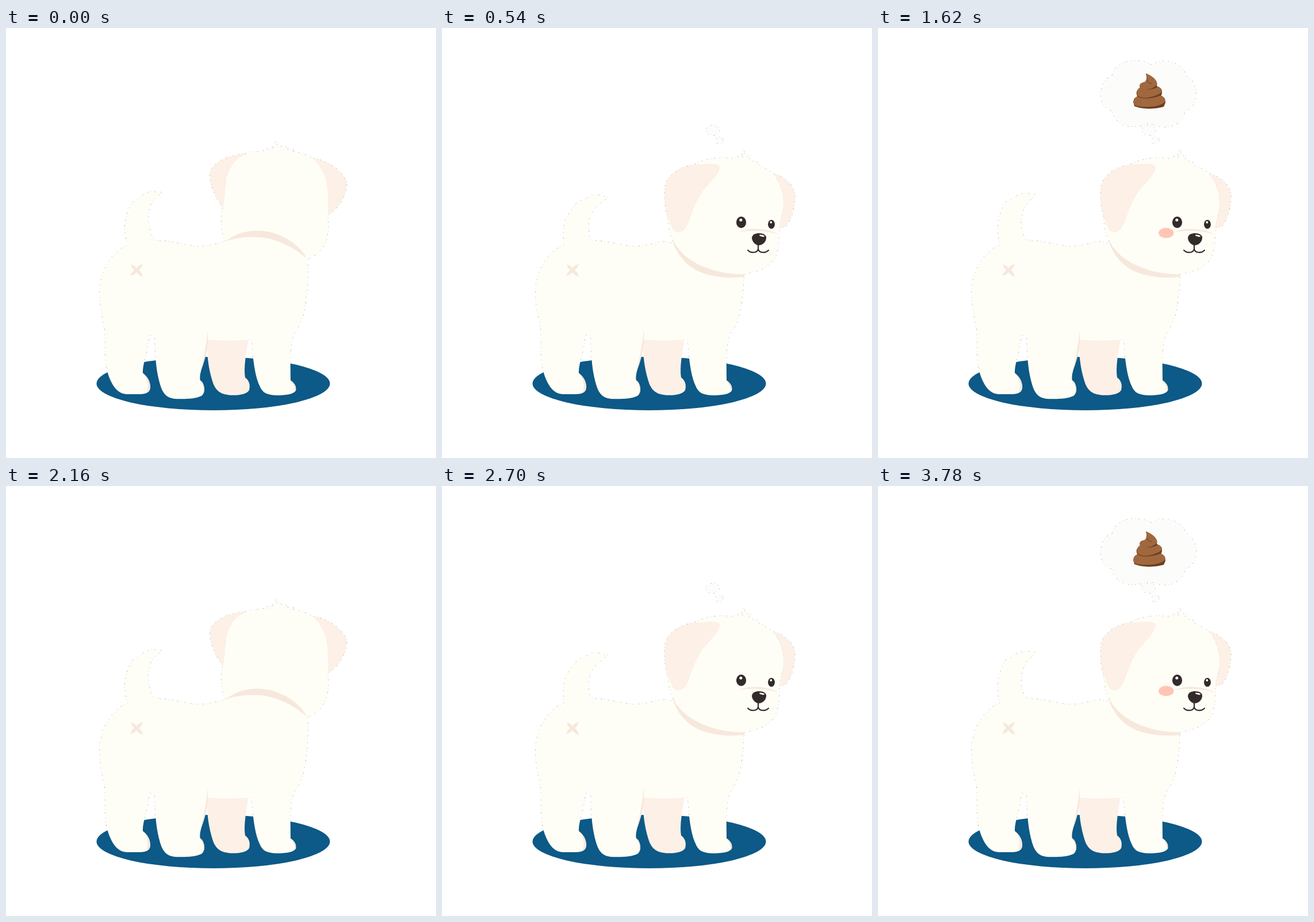
Animation of 748 by 748 pixels, one loop 4320 ms. Source, as an HTML page without scripts:

```html
<!DOCTYPE html>
<html lang="en">
<head>
<meta charset="utf-8">
<title>Puppy with a thought</title>
<style>
  html, body { margin: 0; width: 100%; height: 100%; overflow: hidden; background: #fff; }
  svg { display: block; width: 100%; height: 100%; }
  .fur { fill: #fffef6; }
  .ear { fill: #fdf0e6; }
  .shade { fill: #f7e8dd; }
  .ink { fill: #332b2a; }
  .cloud { fill: #fcfcfa; }
  .edge { stroke: #9a9a94; stroke-width: 1; stroke-dasharray: 2 5 1 4 3 7; }

  /* one cycle is eight beats of 270 ms */
  .back, .dot, .front, .thought, .left, .right, .blush { animation: 2160ms step-end infinite; }
  .back { animation-name: back; }
  .dot { animation-name: dot; }
  .front { animation-name: front; }
  .thought { animation-name: thought; }
  .left { animation-name: left; }
  .right { animation-name: right; }
  .blush { animation-name: blush; }
  @keyframes back { 0% { visibility: visible } 25%, 100% { visibility: hidden } }
  @keyframes dot { 0% { visibility: hidden } 12.5%, 100% { visibility: visible } }
  @keyframes front { 0% { visibility: hidden } 25%, 100% { visibility: visible } }
  @keyframes thought { 0% { visibility: hidden } 37.5%, 100% { visibility: visible } }
  @keyframes left { 0%, 62.5% { visibility: hidden } 37.5%, 75%, 100% { visibility: visible } }
  @keyframes right { 0%, 37.5%, 75%, 100% { visibility: hidden } 25%, 62.5% { visibility: visible } }
  @keyframes blush { 0% { opacity: 0 } 50% { opacity: .45 } 62.5%, 100% { opacity: 1 } }
</style>
</head>
<body>
<svg viewBox="0 0 748 748">
  <defs>
    <path id="body" class="fur" d="M213 377C185 388 165 420 163 455C162 480 168 505 172 525C173 550 171 575 176 597C181 614 190 636 210 637H232C245 637 251 633 251 625C251 614 246 607 238 600C237 585 248 560 249 537Q249 534 252 534H257Q259 535 259 540C259 575 262 600 268 620C273 637 280 643 293 645C310 646 330 645 340 640C348 634 346 621 338 613C336 607 339 597 341 590C345 575 350 560 351 542Q386 545 421 542Q427 540 428 545C429 575 433 605 441 622C446 634 452 638 470 639C488 639 500 637 504 631C506 624 502 618 495 613C495 590 494 570 496 552C498 535 504 528 509 519C520 500 526 465 525 400L383 371C360 378 340 382 318 378C295 373 275 370 258 369Z"/>
    <path id="farLeg" class="ear" d="M351 540H422C418 565 413 590 416 608C424 614 425 622 423 630C418 639 395 640 385 638C370 636 365 628 361 620C354 600 351 580 350 563Z"/>
    <path id="tailBack" class="fur" d="M212 379C205 355 205 335 212 319Q217 306 222 301Q230 298 237 292Q245 285 255 285L273 286C262 291 249 303 248 325C246 340 250 355 257 370Z"/>
    <path id="tailLeft" class="fur" d="M213 379C206 355 207 335 214 320Q218 308 222 303Q232 299 238 294Q246 288 256 288H271Q274 290 271 293C262 301 250 314 249 335C248 350 252 362 259 370Z"/>
    <path id="tailRight" class="fur" d="M213 379C209 350 212 335 220 324Q227 312 237 302Q246 300 253 295Q262 289 270 290L289 295C276 304 262 314 257 330C253 345 255 360 259 370Z"/>
    <g id="headBack">
      <path class="fur" d="M382 371C373 355 373 330 377 311C381 295 381 280 383 262C388 242 398 228 415 219C430 214 445 214 460 213L453 210L466 209L460 207L473 206Q471 201 466 198Q476 200 480 208L490 207L486 210L501 212L495 214Q518 217 534 227C550 240 560 262 560 285V330C563 365 555 390 524 402L490 420L400 400Z"/>
      <path class="ear" d="M418 219C395 219 368 230 358 244C350 258 358 285 376 311L378 311C381 295 381 280 383 262C388 242 398 228 418 219Z"/>
      <path class="ear" d="M534 227C560 229 585 250 592 266C595 285 582 310 562 325H560C559 310 561 295 559 280C557 258 548 240 534 227Z"/>
    </g>
    <g id="headFront">
      <path class="fur" d="M440 237C455 228 475 226 490 226L509 227L514 222L516 226L526 224L520 220L528 221Q526 215 522 212Q531 217 532 224L537 222L534 228L545 234L550 232L546 236Q563 244 577 254C590 272 595 290 594 310C592 325 588 335 587 350C587 370 585 390 578 402C565 420 545 424 527 428C490 432 440 425 400 367C394 350 392 330 392 320C390 280 410 250 440 237Z"/>
      <path class="ear" d="M483 240C479 234 455 236 440 238C415 240 393 255 388 275C386 295 388 320 395 335C400 350 404 356 412 356C425 353 428 340 433 327C440 307 448 288 463 273C475 260 484 250 483 240Z"/>
      <path class="ear" d="M577 254C593 257 612 272 614 290C614 310 608 335 597 346L587 347C588 335 594 325 594 305C594 285 588 268 577 254Z"/>
    </g>
    <path id="cloud" class="cloud" d="M408 82C410 65 430 57 445 57C460 57 470 60 475 64C490 56 505 57 513 60C528 66 534 74 535 82C547 88 554 102 553 115C552 132 545 142 534 144C532 160 518 172 500 172C488 172 478 168 471 165C458 172 445 173 432 170C418 166 409 156 407 144C394 141 387 128 388 114C388 98 396 86 408 82Z"/>
    <ellipse id="puff" class="cloud" cx="471" cy="178" rx="11.5" ry="8.8"/>
    <circle id="dot" class="cloud" cx="482.5" cy="195.5" r="6.3"/>
  </defs>

  <!-- faint broken contour, half hidden by the fills above it -->
  <g class="edge">
    <use href="#body"/>
    <use class="back" href="#tailBack"/>
    <use class="left" href="#tailLeft"/>
    <use class="right" href="#tailRight"/>
    <use class="back" href="#headBack"/>
    <use class="front" href="#headFront"/>
    <use class="thought" href="#cloud"/>
    <use class="front" href="#puff"/>
    <use class="dot" href="#dot"/>
  </g>

  <ellipse cx="360.5" cy="618.5" rx="203" ry="46.5" fill="#0d5987"/>
  <use href="#farLeg"/>
  <use class="back" href="#tailBack"/>
  <use class="left" href="#tailLeft"/>
  <use class="right" href="#tailRight"/>
  <use href="#body"/>
  <g class="shade">
    <path d="M351 525C353 550 348 574 339 596C343 575 349 550 351 525Z"/>
    <path d="M240 602C248 609 253 620 250 629Q248 633 244 634Q251 620 240 602Z"/>
    <path d="M339 613C346 620 347 632 341 639Q346 627 339 613Z"/>
    <path d="M495 613C503 618 507 626 502 632Q502 622 495 613Z"/>
    <path d="M217 411Q225 413 227 418Q230 412 238 411Q236 418 231 421Q237 426 238 433Q230 430 227 425Q223 430 216 431Q218 425 223 421Q218 417 217 411Z"/>
  </g>

  <g class="back">
    <use href="#headBack"/>
    <path class="shade" d="M382 371C410 348 450 349 475 360C497 369 516 385 523 401C505 385 480 371 455 366C430 361 405 364 382 371Z"/>
  </g>

  <g class="front">
    <use href="#headFront"/>
    <path class="shade" d="M400 367C412 390 432 407 460 417C485 426 505 429 527 428L525 433C500 436 475 434 450 425C426 415 408 395 400 367Z"/>
    <path class="shade" d="M516 355C530 348 562 346 586 359C560 352 540 351 516 355Z"/>
    <ellipse class="blush" cx="501.3" cy="356.5" rx="13.2" ry="9" fill="#ffc5b4"/>
    <g class="ink">
      <ellipse cx="520.5" cy="338" rx="8.6" ry="10"/>
      <ellipse cx="573" cy="341.5" rx="6" ry="7.7"/>
      <path d="M552 357C560 357 565 361 564 366C563 374 556 378 551 378C545 378 539 371 539 365C540 359 545 357 552 357Z"/>
    </g>
    <g fill="#fff">
      <circle cx="519.8" cy="334" r="2.5"/>
      <circle cx="572.3" cy="338" r="1.9"/>
      <ellipse cx="556.5" cy="361.3" rx="4.6" ry="1.4" transform="rotate(14 556.5 361.3)"/>
    </g>
    <path d="M532 386.500C537 392 549 392 550 384V377M550 384C551 392 563 392 568 386.500" fill="none" stroke="#332b2a" stroke-width="2.100" stroke-linecap="round"/>
  </g>

  <use class="dot" href="#dot"/>
  <use class="front" href="#puff"/>
  <g class="thought">
    <use href="#cloud"/>
    <path fill="#6d3d1e" d="M466 79C478 84 488 92 485 101Q495 104 494 113Q493 118 491 119Q500 121 500 130L497 137Q486 140 472 140.500Q456 140 446 136L444 129Q445 121 451 119Q448 112 452 107L456 103Q454 97 460 95Q470 94 466 79Z"/>
    <g fill="#a1683f">
      <path d="M466 79C478 84 487 92 485 99Q479 106 466 107Q455 107 455 101Q455 96 461 95Q471 93 466 79Z"/>
      <path d="M456 103Q463 108 472 107Q482 106 487 102Q495 105 493 112Q486 118 470 121Q455 122 451 117Q449 108 456 103Z"/>
      <path d="M451 119Q460 124 473 122Q484 121 492 117Q500 121 500 127Q495 135 474 137Q450 138 445 133Q444 122 451 119Z"/>
    </g>
    <path d="M468.500 90Q468 96 476 96.500" fill="none" stroke="#6d3d1e"/>
  </g>
</svg>
</body>
</html>
```
